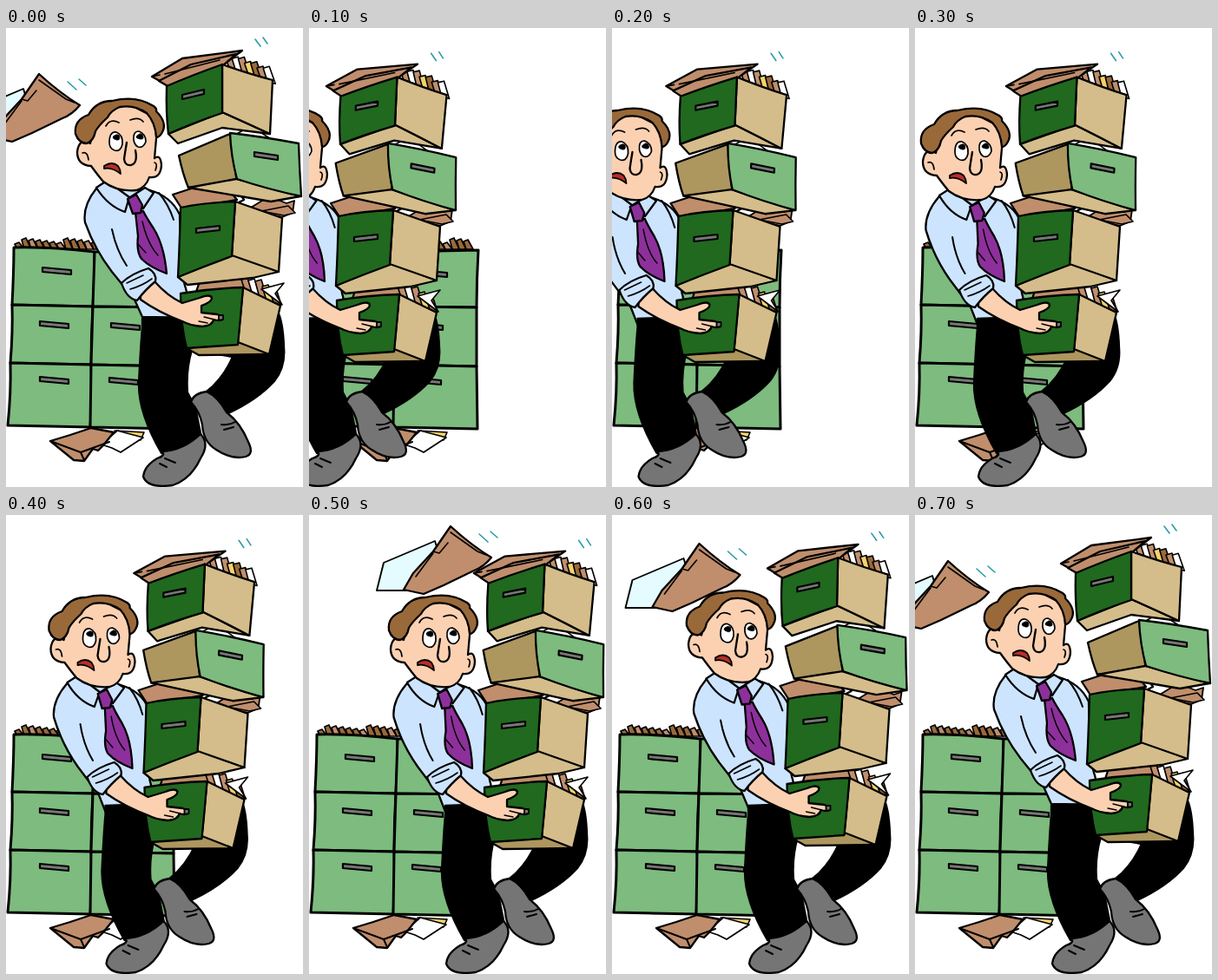
An HTML page for the animation above (1700 ms loop, 342 by 529 pixels).

```html
<!DOCTYPE html>
<html lang="en">
<head>
<meta charset="utf-8">
<style>
html, body { margin: 0; width: 100%; height: 100%; overflow: hidden; background: #fff; }
svg { display: block; width: 342px; height: 529px; }
path { stroke: #000; stroke-linejoin: round; stroke-linecap: round; }
</style>
</head>
<body>
<svg id="stage" viewBox="0 0 342 529"></svg>
<script>
const LIGHT = '#7dbb7e', DARK = '#20691f', TAN = '#d4bd8a', SHADE = '#ae965f',
      BROWN = '#c08e6c', HAIR = '#9a693a', SKIN = '#fbd1b2', SHIRT = '#cde4ff',
      TIE = '#8e309b', SHOE = '#757575', WHITE = '#fff', PAPER = '#e4fbff', YELLOW = '#f3d36a';

const shape = (fill, d, width = 2.3) => `<path fill="${fill}" d="${d}" style="stroke-width:${width}"/>`;
const line = (d, width = 2) => shape('none', d, width);
const streaks = d => `<path fill="none" d="${d}" style="stroke:#2a9ca6;stroke-width:1.6"/>`;
const group = (id, ...parts) => `<g id="${id}">${parts.join('')}</g>`;
const handle = (x, y, slope = 2, w = 33) =>
  shape('#777', `M${x} ${y}l${w} ${slope}v5l${-w} ${-slope}z`, 2.2);

// Upright sheets along an edge, alternating colours
function sheets(count, x, y, stepX, stepY, height) {
  const colors = [BROWN, WHITE, BROWN, YELLOW, HAIR];
  return Array.from({ length: count }, (_, i) => {
    const h = height + (i * 7 % 5);
    return shape(colors[i % 5], `M${x + i * stepX} ${y + i * stepY}l-5 ${-h}l7 -2l7 ${h + 4}z`, 1.6);
  }).join('');
}

function cabinet() {
  const tops = Array.from({ length: 22 }, (_, i) => {
    const x = 13 + i * 8, h = 6 + i * 5 % 6;
    return shape(i % 4 == 2 ? BROWN : HAIR, `M${x} 255l-3 ${-h}l5 -2l6 ${h + 2}z`, 1.7);
  }).join('');
  const drawers = [
    'M9 253Q50 252 102 258Q102 290 100 321L7 319Q9 280 9 253Z',
    'M102 258L195 256Q193 290 193 322L100 321Z',
    'M7 319L100 321Q98 354 98 388L5 386Q8 350 7 319Z',
    'M100 321L193 322L193 390L98 388Z',
    'M5 386L98 388Q100 425 97 460L2 458Q6 420 5 386Z',
    'M98 388L193 390L194 462L97 460Z'
  ].map(d => shape(LIGHT, d, 3)).join('');
  const handles = [[42, 276], [126, 279], [39, 338], [121, 340], [39, 402], [119, 403]]
    .map(([x, y]) => handle(x, y, 3)).join('');
  return tops + drawers + handles;
}

const floorPapers =
  shape(YELLOW, 'M125 464L159 466L155 475L130 470Z', 1.6) +
  shape(WHITE, 'M110 480L128 464L158 472L132 489L122 484Z', 1.8) +
  shape(BROWN, 'M51 476L74 469L98 461L124 466L112 481L106 487L100 485L90 499L78 498Z') +
  line('M51 476L86 489L119 477M86 489L90 498');

const torso =
  shape(SHIRT, 'M104 185Q88 205 91 224Q102 255 122 281L148 313L157 333L215 334L207 300Q201 285 200 215Q190 194 166 187Z') +
  line('M176 190Q187 203 193 221M122 232Q127 256 139 274') +
  shape(SHIRT, 'M104 184L116 176L142 195L137 212Q117 205 104 184Z') +
  shape(SHIRT, 'M143 195L160 184L170 190L158 208Z') +
  shape(TIE, 'M149 212L158 211Q162 219 170 231Q182 250 185 283Q166 276 156 266Q150 258 152 240Z') +
  shape(TIE, 'M140 197L150 192L157 204L155 213L146 214Z') +
  line('M157 223Q163 249 175 262M152 249L161 259', 1.4);

const head =
  shape(SKIN, 'M97 133Q84 126 82 143Q82 158 98 159Q106 170 112 177Q128 189 150 187Q161 184 165 172Q178 174 179 158Q178 145 171 150L175 105L140 87L105 100Z') +
  shape(HAIR, 'M93 133Q84 133 80 122Q78 106 95 100Q104 84 122 84Q150 77 170 90Q174 93 173 96Q186 109 180 120Q177 126 173 126Q172 109 162 98Q148 88 131 91Q121 95 117 103Q107 112 103 119Q101 130 93 133Z') +
  line('M88 144Q94 142 95 152M171 155Q175 156 172 164M115 113Q120 104 130 109M143 106Q153 102 158 108', 1.7) +
  shape(WHITE, 'M119 132Q119 119 127 120Q135 123 134 134Q132 143 125 141Q119 139 119 132Z', 1.7) +
  shape(WHITE, 'M147 129Q146 119 153 119Q161 122 161 131Q158 139 152 137Q148 135 147 129Z', 1.7) +
  shape('#000', 'M127 123q4 -1 4 3t-4 3t-4 -3t4 -3zM154 122q3 -1 4 3t-4 3t-4 -3t4 -3z', .5) +
  shape(SKIN, 'M139 132Q137 144 136 151Q137 159 144 158Q152 156 149 141') +
  shape('#b52f27', 'M113 159Q122 153 129 159Q132 163 132 168Q122 160 113 162Z', 1.8);

const legs =
  shape('#000', 'M157 335L213 333L312 325Q319 337 320 368Q322 391 309 407Q290 428 256 444L231 419Q250 404 261 379L214 371Q207 395 209 420L218 437L225 472L204 490L179 490Q152 443 153 409Q155 367 157 345Z') +
  shape(SHOE, 'M180 488Q204 487 224 468Q235 479 224 496Q213 520 192 527Q163 531 158 517Q159 505 174 496Q184 493 180 488Z') +
  line('M183 496Q190 499 195 501M177 502L185 506') +
  shape(SHOE, 'M213 431Q216 421 231 419Q244 425 254 443Q270 455 279 477Q286 491 276 494Q260 498 242 486Q227 477 226 457Q223 442 213 431Z') +
  line('M248 457Q257 458 264 454M251 463L262 460');

const bottomDrawer =
  shape(BROWN, 'M219 304L224 289L273 285L281 303Z') +
  sheets(5, 276, 305, 8, 3, 15) +
  shape(WHITE, 'M294 301L320 294L310 306L318 319Z', 1.6) +
  shape(SHADE, 'M208 369L222 377L303 376L267 360Z') +
  shape(TAN, 'M273 299L316 320L303 376L267 362Z') +
  shape(DARK, 'M201 306Q236 300 273 299Q270 335 267 365L208 369Q201 342 201 306Z');

const thirdDrawer =
  shape(BROWN, 'M277 210L303 194L323 202L332 199L330 213L318 218Z', 1.8) +
  shape(BROWN, 'M294 211L325 205L333 213L320 216Z', 1.7) +
  shape(WHITE, 'M236 180L255 169L274 198L256 207Z') +
  shape(BROWN, 'M192 192L247 174L266 198L203 209Z') +
  shape(TAN, 'M198 287L209 296L284 288L314 281L261 260Z') +
  shape(TAN, 'M264 200L318 219L314 281L260 262Z') +
  shape(DARK, 'M201 207Q228 201 264 200L260 263Q230 274 198 287Q200 247 201 207Z') +
  handle(219, 231, -3, 27);

const secondDrawer =
  shape(WHITE, 'M262 124L282 113L305 128Z', 1.6) +
  shape(SHADE, 'M199 147L258 122L266 178L253 180L210 184Q204 170 199 147Z') +
  shape(TAN, 'M210 184L265 174L339 194L305 200L270 194Z') +
  shape(LIGHT, 'M258 121Q294 125 337 133Q338 164 340 194Q302 186 266 174Q259 148 258 121Z') +
  handle(286, 143, 4, 27);

const topDrawer =
  sheets(7, 258, 49, 7.2, 2.2, 14) +
  shape(BROWN, 'M168 56L203 35L272 26L248 44L186 66Z') +
  shape(BROWN, 'M176 61L213 42L265 30L250 43L188 68Z') +
  line('M168 56L177 54M183 53L246 37', 1.7) +
  shape(TAN, 'M187 122L198 133L249 115L304 122L249 97Z') +
  shape(TAN, 'M249 42Q280 53 307 60L304 122Q276 109 249 97Z') +
  shape(DARK, 'M185 67Q215 54 249 42L249 98Q216 109 187 122Q184 97 185 67Z') +
  handle(203, 77, -6, 25) +
  streaks('M287 13L293 21M296 11L301 18');

const arm =
  shape(SKIN, 'M155 307L171 292Q186 309 203 317L223 311Q235 306 237 311Q237 316 225 320L225 328L243 330Q250 332 249 336Q245 338 239 336Q238 343 226 344Q212 343 203 338Q176 328 155 313Z') +
  line('M228 333L240 336M222 338L232 340', 1.4) +
  shape('#777', 'M245 331l5 0v5l-5 1z', 1.8) +
  shape(SHIRT, 'M133 294Q144 283 164 277Q174 283 172 292Q160 302 151 314Q139 312 133 294Z') +
  line('M143 301Q157 297 168 289M139 294L158 285', 1.6);

const fallingFolder =
  shape(PAPER, 'M-39 95L20 70L24 83L-12 127L-47 127Z', 1.9) +
  shape(BROWN, 'M-5 107L18 82L38 53Q62 75 85 89Q76 100 65 104L30 121L7 131L-16 126Z') +
  line('M18 82L25 84L35 72M38 60L69 82L79 86M18 84L-2 111', 1.6) +
  streaks('M71 62L81 71M84 59L92 66');

const stage = document.getElementById('stage');
stage.innerHTML = cabinet() + floorPapers + group('walker',
  group('torso', torso), group('legs', legs), group('head', head),
  group('bottom', bottomDrawer), group('third', thirdDrawer),
  group('second', secondDrawer), group('top', topDrawer), group('arm', arm)
) + group('folder', fallingFolder);

const part = id => document.getElementById(id);
const move = (id, x, y, turn = 0) =>
  part(id).setAttribute('transform', `translate(${x} ${y}) rotate(${turn} 260 120)`);

// Shift and turn of each part from the leaning-back pose to standing upright
const upright = {
  head: [12, 11], top: [19, 15, 2.5], second: [3, 12, 3],
  third: [3, 10], bottom: [1, 8], arm: [3, 8]
};

function draw(step) {
  const walking = step >= 1 && step <= 5;
  const lean = walking ? 1 : step === 6 ? 0.5 : 0;
  move('walker', walking ? (step - 5) * 42.5 : 0, 0);
  for (const [id, pose] of Object.entries(upright)) move(id, ...pose.map(v => v * lean));
  part('torso').setAttribute('transform', `matrix(1 0 ${-0.06 * lean} 1 ${20 * lean} ${9 * lean})`);
  part('folder').style.display = step >= 1 && step < 5 ? 'none' : '';
  move('folder', 125 * lean, -40 * lean);
}

function tick() {
  draw(Math.min(7, Math.floor(performance.now() % 1700 / 100)));
  requestAnimationFrame(tick);
}
tick();
</script>
</body>
</html>
```
